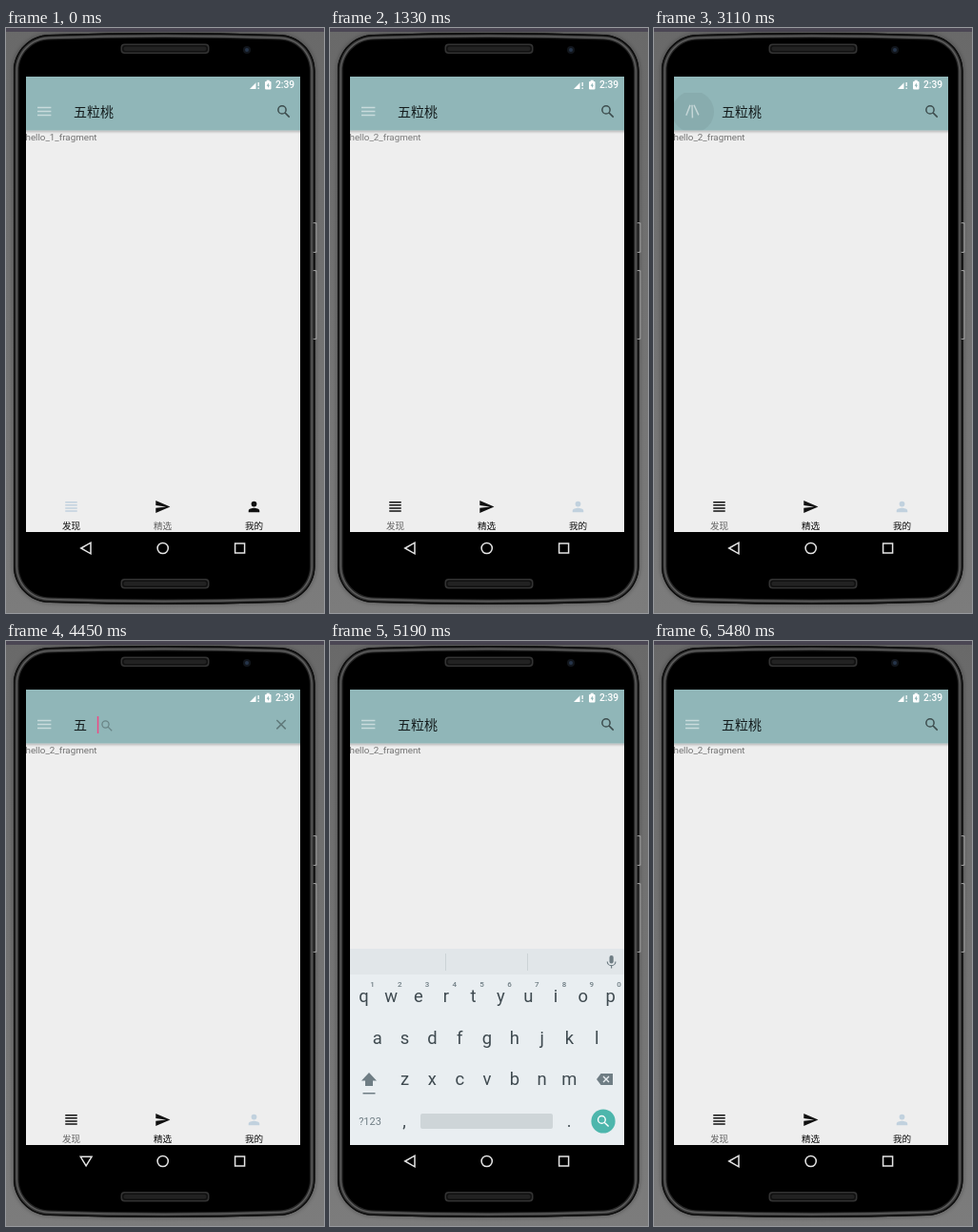
Write an HTML page with a canvas that moves like this. It is 334 px wide and 614 px high and loops after 6.53 s.

```html
<!DOCTYPE html>
<html lang="zh-CN">
<head>
<meta charset="utf-8">
<title>Phone demo</title>
<style>
html, body { margin: 0; width: 100%; height: 100%; overflow: hidden; background: #727272; }
canvas { display: block; width: 334px; height: 614px; }
</style>
</head>
<body>
<canvas id="stage"></canvas>
<script>
const W = 334, H = 614, LOOP = 6530, STEP = 148.2;
const dpr = window.devicePixelRatio || 1;
const LATIN = 'Roboto, "Noto Sans", sans-serif';
const HAN = '"Noto Sans CJK SC", "Noto Sans CJK", sans-serif';
const TITLE = '五粒桃';
const TABS = ['发现', '精选', '我的'];
const PAGES = [1, 3, 2];
const SCREEN = { x: 21, y: 51, w: 288, bar: 107.5, bottom: 529 };
const KB = { x: 21, y: 323, w: 288, h: 206 };

const AT = { tab2: 3, tab3: 8, open: 15, close: 21, search: 30, leave: 35 };

function surface(canvas, w, h) {
  canvas.width = w * dpr;
  canvas.height = h * dpr;
  const ctx = canvas.getContext('2d');
  ctx.scale(dpr, dpr);
  return ctx;
}

const main = surface(document.getElementById('stage'), W, H);
let c = main;

const clamp = v => Math.max(0, Math.min(1, v));
const lerp = (a, b, p) => a + (b - a) * p;
const easeOut = u => 1 - (1 - u) ** 2;
const ramp = (n, from, len) => easeOut(clamp((n - from + 1) / len));

// Everything that moves, as a function of the step number.
function pose(n) {
  const tab = (n >= AT.tab2) + (n >= AT.tab3);
  const tabStart = [0, AT.tab2, AT.tab3][tab];
  const closing = n >= AT.close;
  return {
    tab,
    fade: tab ? clamp((n - tabStart + 1) * .45) : 1,
    closing,
    arrow: ramp(n, AT.open, 3) - ramp(n, AT.close, 3.5),
    pressed: n - (closing ? AT.close : AT.open),
    searching: n >= AT.search && n < AT.leave,
    cursor: n >= AT.search && n < AT.search + 2,
    keyboard: clamp(Math.min(n - AT.search - .25, AT.leave + 1.25 - n)),
  };
}

function rect(x, y, w, h, fill, r = 0) {
  c.fillStyle = fill;
  c.beginPath();
  c.roundRect(x, y, w, h, r);
  c.fill();
}

function disc(x, y, r, fill) {
  c.fillStyle = fill;
  c.beginPath();
  c.arc(x, y, r, 0, 7);
  c.fill();
}

function stroke(path, color, width) {
  c.strokeStyle = color;
  c.lineWidth = width;
  c.stroke(new Path2D(path));
}

function fill(path, color) {
  c.fillStyle = color;
  c.fill(new Path2D(path));
}

function cross(x, y, r, color, width) {
  stroke(`M${x - r} ${y - r}l${2 * r} ${2 * r}m0 ${-2 * r}l${-2 * r} ${2 * r}`, color, width);
}

function text(str, x, y, size, color, align = 'left', family = LATIN, weight = 400) {
  c.font = `${weight} ${size}px ${family}`;
  c.textAlign = align;
  c.fillStyle = color;
  c.fillText(str, x, y);
}

function icon(path, x, y, scale, color) {
  c.save();
  c.translate(x, y);
  c.scale(scale, scale);
  c.translate(-12, -12);
  fill(path, color);
  c.restore();
}

const ICONS = [
  'M4 5h16v2H4zM4 9h16v2H4zM4 13h16v2H4zM4 17h16v2H4z',
  'M2 21L23 12 2 3V10L17 12 2 14z',
  'M12 12a4 4 0 1 0 0-8a4 4 0 0 0 0 8zm0 2c-2.7 0-8 1.3-8 4v2h16v-2c0-2.7-5.3-4-8-4z',
];

function magnifier(x, y, s, color) {
  c.strokeStyle = color;
  c.lineWidth = 2 * s;
  c.beginPath();
  c.arc(x - 2.3 * s, y - 2.3 * s, 5.5 * s, 0, 7);
  c.moveTo(x + 1.7 * s, y + 1.7 * s);
  c.lineTo(x + 8 * s, y + 8 * s);
  c.stroke();
}

// Round-cornered case whose short sides bulge a little.
function body(inset) {
  const l = 8 + inset, r = 324.5 - inset, t = 7 + inset, b = 603 - inset;
  const q = 38 - inset, k = q * .45, mid = (l + r) / 2;
  return new Path2D(`M${l} ${t + q}C${l} ${t + k} ${l + k} ${t} ${l + q} ${t}
    Q${mid} ${t - 4} ${r - q} ${t}C${r - k} ${t} ${r} ${t + k} ${r} ${t + q}
    V${b - q}C${r} ${b - k} ${r - k} ${b} ${r - q} ${b}
    Q${mid} ${b + 4} ${l + q} ${b}C${l + k} ${b} ${l} ${b - k} ${l} ${b - q}Z`);
}

function speaker(y) {
  ['#333', '#111', '#222'].forEach((color, i) => {
    rect(120.5 + 1.5 * i, y + 1.5 * i, 93 - 3 * i, 10.5 - 3 * i, color, 4 - i);
  });
}

function button(y, h) {
  rect(322.5, y, 4, h, '#9a9a9a', 1);
  rect(322, y + 1, 3.2, h - 2, '#2a2a2a', 1);
}

function drawPhone() {
  const g = c.createLinearGradient(0, 0, 0, H);
  g.addColorStop(0, '#696969');
  g.addColorStop(1, '#7c7c7c');
  rect(0, 0, W, H, g);
  rect(0, 0, W, 4, '#4b4754');
  c.save();
  c.shadowColor = 'rgba(0,0,0,.4)';
  c.shadowBlur = 5 * dpr;
  c.fillStyle = '#0b0b0b';
  c.fill(body(0));
  c.restore();
  ['#0b0b0b', '#3a3a3a', '#5c5c5c', '#242424', '#000'].forEach((color, i) => {
    c.fillStyle = color;
    c.fill(body(i * 1.4));
  });
  button(204, 32);
  button(254, 73);
  speaker(16.5);
  speaker(578);
  disc(253, 23, 4, '#12161c');
  disc(253, 23, 2, '#26354a');
}

function drawStatus() {
  fill('M256 64h8v-8z', '#fff');
  rect(262.5, 55, 4, 9, '#90b6b8');
  rect(264.5, 57, 1.3, 4, '#fff');
  rect(264.5, 62.4, 1.3, 1.5, '#fff');
  rect(272, 56, 6.5, 8.5, '#fff', 1);
  rect(273.7, 54.7, 3, 2, '#fff');
  fill('M275.8 57.5l-2.2 3.2h1.4v2.3l2-3.2h-1.2z', '#90b6b8');
  text('2:39', 303, 63.3, 10.2, '#fff', 'right', LATIN, 500);
}

// Menu bars fold into an arrow while the whole glyph turns half a circle.
function drawMenu(p, closing) {
  const tilt = p * Math.PI / 4;
  const bar = lerp(18, 8 * Math.SQRT2, p), left = -lerp(9, 8, p);
  const dx = bar * Math.cos(tilt), dy = bar * Math.sin(tilt), gap = lerp(5, 0, p);
  c.save();
  c.translate(40.2, 87.6);
  c.rotate((closing ? 1 : -1) * Math.PI * (1 - p));
  c.scale(.8, .8);
  stroke(`M${left} 0H${-left}M${left} ${gap}l${dx} ${dy}M${left} ${-gap}l${dx} ${-dy}`,
    'rgba(255,255,255,.5)', 1.9);
  c.restore();
}

function drawRipple(age) {
  if (age < 0 || age > 1) return;
  c.save();
  c.beginPath();
  c.rect(SCREEN.x, 68, SCREEN.w, SCREEN.bar - 68);
  c.clip();
  disc(41, 88, 22 + 3 * age, `rgba(0,0,0,${.055 - .03 * age})`);
  c.restore();
}

function drawBar(s) {
  rect(SCREEN.x, SCREEN.y, SCREEN.w, SCREEN.bar - SCREEN.y, '#90b6b8');
  drawStatus();
  drawRipple(s.pressed);
  drawMenu(s.arrow, s.closing);
  text(s.searching ? TITLE[0] : TITLE, 71, 93.2, 14, '#151d1e', 'left', HAN);
  if (s.searching) {
    if (s.cursor) rect(95.8, 79, 1.5, 18, '#ee4a86');
    magnifier(106, 89, .65, 'rgba(0,0,0,.27)');
    cross(289, 87.7, 4.7, 'rgba(0,0,0,.34)', 1.5);
  } else {
    magnifier(291.7, 87.6, .75, 'rgba(0,0,0,.58)');
  }
}

function drawPage({ tab, fade }) {
  const { x, w, bar, bottom } = SCREEN;
  rect(x, bar - .5, w, bottom - bar + .5, '#eee');
  const shade = c.createLinearGradient(0, bar, 0, bar + 3.5);
  shade.addColorStop(0, 'rgba(0,0,0,.22)');
  shade.addColorStop(1, 'rgba(0,0,0,0)');
  rect(x, bar, w, 3.5, shade);

  const label = (i, alpha) => {
    c.globalAlpha = alpha;
    text(`hello_${PAGES[i]}_fragment`, 20.5, 117.7, 9.8, '#737373');
  };
  if (fade < 1) label(tab - 1, 1 - fade);
  label(tab, fade);
  c.globalAlpha = 1;

  ICONS.forEach((path, i) => {
    const cx = 68.5 + 96 * i;
    icon(path, cx, 502.4, i ? .72 : .78, i === tab ? '#c1d1de' : '#111');
    text(TABS[i], cx, 526.4, 9.6, i === (tab + 1) % 3 ? '#666' : '#111', 'center', HAN);
  });
}

function drawNav({ searching, keyboard }) {
  rect(SCREEN.x, SCREEN.bottom, SCREEN.w, 36, '#000');
  stroke(searching ? 'M78.3 541.3h11.7l-5.9 9.5z' : 'M78.8 546l10.2-5.8v11.6z', '#e4e4e4', 1.5);
  c.beginPath();
  c.arc(164.7, 546, 5.6, 0, 7);
  c.stroke();
  c.strokeRect(240.6, 541, 10, 10);
  if (keyboard) {
    c.globalAlpha = keyboard;
    c.drawImage(keys, KB.x, KB.y + Math.round(43 * (1 - keyboard)), KB.w, KB.h);
    c.globalAlpha = 1;
  }
}

function drawMic(x, y, color) {
  rect(x - 2.1, y - 7, 4.2, 8.6, color, 2.1);
  stroke(`M${x - 4.3} ${y - .6}a4.3 4.3 0 0 0 8.6 0M${x} ${y + 3.6}v2.8`, color, 1.2);
}

function makeKeyboard() {
  const canvas = document.createElement('canvas');
  const ink = '#3f4a50', soft = '#6f7d84', face = '#e9eef1', pitch = KB.w / 10;
  c = surface(canvas, KB.w, KB.h);
  c.translate(-KB.x, -KB.y);
  rect(KB.x, KB.y, KB.w, KB.h, face);
  rect(KB.x, KB.y, KB.w, 27, '#e1e6e9');
  stroke('M121.5 328v18M207.5 328v18', '#ccd3d6', 1);
  drawMic(295.6, 337, soft);

  ['qwertyuiop', 'asdfghjkl', 'zxcvbnm'].forEach((row, r) => {
    [...row].forEach((ch, i) => {
      const x = 165 + pitch * (i - (row.length - 1) / 2);
      text(ch, x, 378.8 + 43.8 * r, 18.4, ink, 'center');
      if (!r) text((i + 1) % 10, x + 9, 362.6, 8, soft, 'center', LATIN, 500);
    });
  });

  fill('M41 453l8 8.5h-4v5.5h-8v-5.5h-4z', soft);
  rect(34.5, 474, 13, 1.5, soft);
  fill('M280 460l4.5-6H297v12h-12.5z', soft);
  cross(290, 460, 3, face, 1.4);

  text('?123', 42, 508, 11, soft, 'center');
  text(',', 78, 510, 18, ink, 'center');
  rect(95, 496, 139, 16, '#ced5d8', 2);
  text('.', 251, 510, 18, ink, 'center');
  disc(287, 504, 12.6, '#4db6ac');
  magnifier(287, 504, .7, '#fff');
  c = main;
  return canvas;
}

const keys = makeKeyboard();

function draw(t) {
  const s = pose(Math.floor((t + 5) / STEP) % Math.round(LOOP / STEP));
  drawPhone();
  drawPage(s);
  drawBar(s);
  drawNav(s);
}

const start = performance.now();
function tick() {
  draw((performance.now() - start) % LOOP);
  requestAnimationFrame(tick);
}
tick();
</script>
</body>
</html>
```
